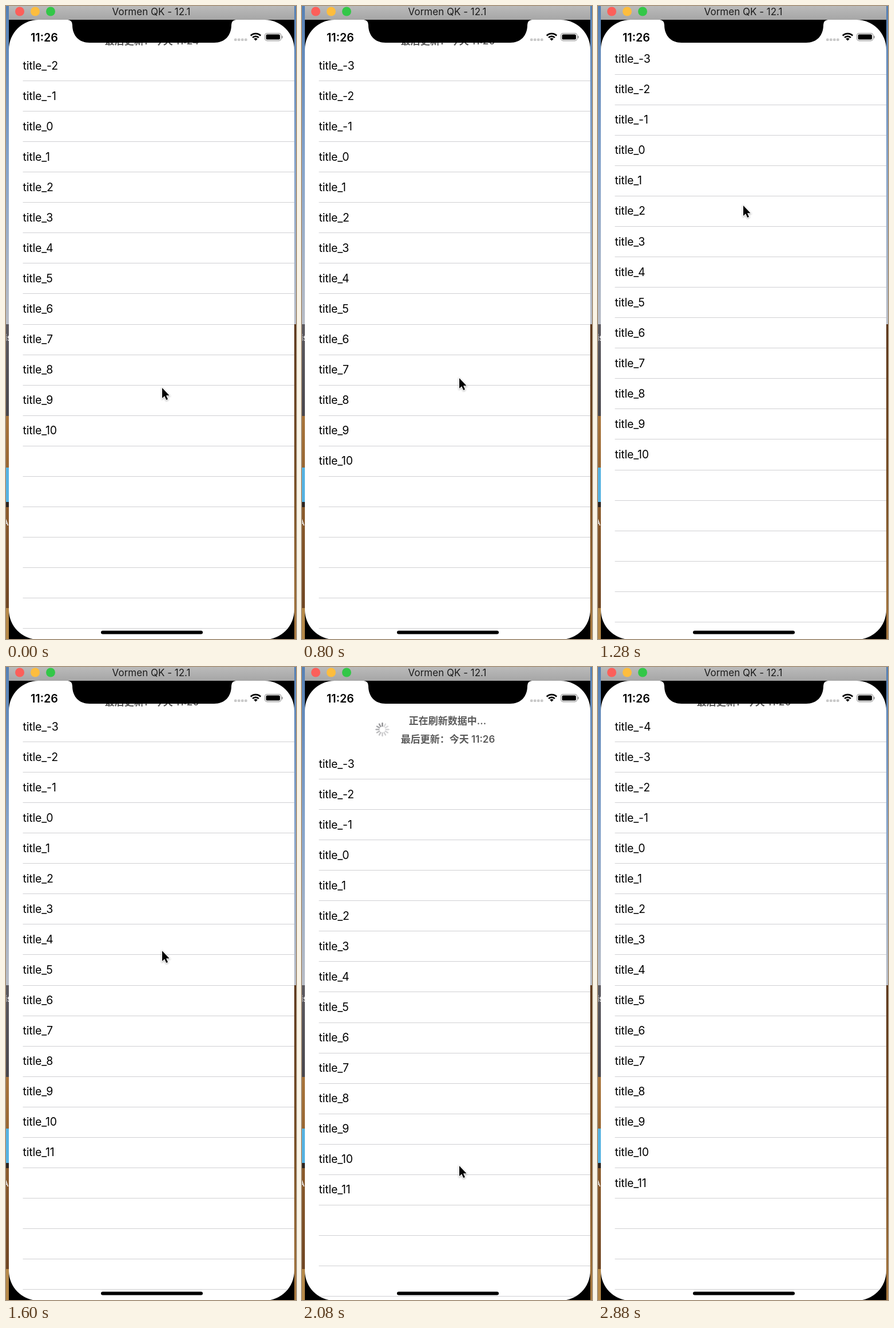
An HTML page with a canvas that plays this animation: 507x1104 px, repeating every 3200 ms.

```html
<!DOCTYPE html>
<html lang="zh-CN">
<head>
<meta charset="utf-8">
<style>
  html, body { margin: 0; width: 100%; height: 100%; overflow: hidden; }
  canvas { display: block; }
</style>
</head>
<body>
<canvas id="stage" width="507" height="1104"></canvas>
<script>
const ctx = document.getElementById('stage').getContext('2d');
const LOOP = 3200, STEP = 160, ROW = 53.07;
const FONT = 'Inter, "Noto Sans CJK SC", "Noto Sans CJK", sans-serif';

// One entry per step; the last one holds until the loop restarts.
const offsets = [0, 100, 62.5, 40, 15, 0, -36, -33, -11.4, 0, 0, 0, 157, 65, 35, 0];
const cursors = [[273, 666], [275, 790], [274, 675], [275, 669], [275, 660], [275, 649],
  [271, 520], [261, 400], [254, 348], [269, 400], [273, 495], [275, 639], [275, 870], [275, 870]];
const hints = { release: '松开立即刷新', loading: '正在刷新数据中...', done: '下拉可以刷新' };
const states = { 1: 'release', 12: 'release', 13: 'loading' };

function rect(x, y, w, h, color, radius = 0) {
  ctx.fillStyle = color;
  ctx.beginPath();
  ctx.roundRect(x, y, w, h, radius);
  ctx.fill();
}

function text(str, x, y, size, weight, color, align = 'left', spacing = 0) {
  ctx.font = `${weight} ${size}px ${FONT}`;
  ctx.letterSpacing = spacing + 'px';
  ctx.textAlign = align;
  ctx.fillStyle = color;
  ctx.fillText(str, x, y);
}

function disc(x, y, r, color) {
  rect(x - r, y - r, 2 * r, 2 * r, color, r);
}

function gradient(y0, y1, ...colors) {
  const g = ctx.createLinearGradient(0, y0, 0, y1);
  colors.forEach((c, i) => g.addColorStop(i / (colors.length - 1), c));
  return g;
}

function drawDesktop() {
  rect(0, 0, 507, 555, gradient(0, 555, '#5580b5', '#86a4cb', '#b9bdc6'));
  rect(0, 555, 6, 160, gradient(555, 715, '#5c5a60', '#48464c'));
  rect(0, 715, 6, 335, gradient(715, 1050, '#a8743a', '#8a5a2b', '#6f4522'));
  rect(0, 1050, 6, 54, '#b58848');
  rect(0, 805, 6, 60, '#55b2e2');
  rect(0, 865, 6, 9, '#2c2420');
  text('is', -2, 584, 15, 500, '#eee');
  text('A', -6, 906, 15, 500, '#eee');
  rect(503, 555, 4, 549, gradient(555, 1104, '#5a3418', '#74491f', '#a8783e'));
}

function drawWindow() {
  rect(5, 0, 499, 24, gradient(0, 24, '#bababa', '#a6a6a6'));
  rect(5, 24, 499, 1080, '#000');
  disc(24, 9.5, 8, '#fc5f5a');
  disc(51, 9.5, 8, '#fdbd3e');
  disc(78, 9.5, 8, '#33c748');
  text('Vormen QK - 12.1', 254, 16, 17, 400, '#1c1c1c', 'center');
}

function drawSpinner(strength) {
  ctx.lineWidth = 2.4;
  for (let i = 0; i < 12; i++) {
    ctx.rotate(Math.PI / 6);
    ctx.strokeStyle = `rgba(100,100,105,${strength * (0.25 + 0.5 * (i / 11) ** 2)})`;
    ctx.beginPath();
    ctx.moveTo(0, -6);
    ctx.lineTo(0, -11);
    ctx.stroke();
  }
}

function drawArrow() {
  ctx.rotate(0.21);
  ctx.lineWidth = 1.8;
  ctx.strokeStyle = '#5a5a5a';
  ctx.stroke(new Path2D('M0 14V-13M-8 -5L0 -13L8 -5'));
}

function drawHeader(offset, state, clock) {
  const y = offset - 63;
  text(hints[state], 254.5, 98 + y, 17, 600, '#5a5a5a', 'center');
  text('最后更新：今天 ' + clock, 255, 130 + y, 17, 600, '#5a5a5a', 'center');
  ctx.save();
  ctx.translate(140.5, 107 + y);
  ctx.lineCap = 'round';
  if (state === 'release') drawArrow();
  else drawSpinner(state === 'loading' ? 1 : 0.75);
  ctx.restore();
}

function drawList(offset, first, last) {
  for (let i = 0; i < 21; i++) {
    const y = offset + i * ROW;
    if (first + i <= last) text('title_' + (first + i), 29.5, 110.5 + y, 19.5, 400, '#000', 'left', -0.15);
    rect(29.5, Math.round(130 + y), 475, 1, '#d0d0d3');
  }
}

function drawStatusBar() {
  ctx.fillStyle = '#000';
  ctx.fill(new Path2D('M108 23V24Q116 25 116 33C116 52 128 64 146 64H364C382 64 394 52 394 33Q394 25 402 24V23Z'));
  text('11:26', 43, 61.5, 19.7, 600, '#000');
  for (let i = 0; i < 4; i++) rect(399 + i * 6, 56.5, 4.6, 4.6, '#c9c9c9', 1.5);

  const up = -Math.PI / 2, spread = Math.PI / 4;
  ctx.strokeStyle = '#000';
  for (const [radius, width] of [[2.3, 4.6], [7.6, 2.8], [12.3, 2.8]]) {
    ctx.lineWidth = width;
    ctx.beginPath();
    ctx.arc(436.5, 60.5, radius, up - spread, up + spread);
    ctx.stroke();
  }

  ctx.strokeStyle = '#999';
  ctx.lineWidth = 1.2;
  ctx.beginPath();
  ctx.roundRect(452.6, 47.6, 28.4, 13, 4);
  ctx.stroke();
  rect(454.6, 49.6, 24.4, 9, '#000', 2.2);
  rect(482, 51.8, 1.8, 4.6, '#999', 1);
  rect(166, 1089.5, 178, 6, '#000', 3);
}

function drawCursor([x, y]) {
  const shape = new Path2D('M0 0V18L4.2 14.2L7.2 21L10 19.8L7 13.2H12.6Z');
  ctx.save();
  ctx.translate(x, y);
  ctx.shadowColor = 'rgba(0,0,0,.35)';
  ctx.shadowBlur = 3;
  ctx.shadowOffsetY = 1;
  ctx.lineWidth = 2;
  ctx.strokeStyle = '#fff';
  ctx.stroke(shape);
  ctx.shadowColor = 'transparent';
  ctx.fillStyle = '#000';
  ctx.fill(shape);
  ctx.restore();
}

function draw(now) {
  const step = Math.min(Math.floor(now % LOOP / STEP), offsets.length - 1);
  const offset = offsets[step];
  const first = step < 2 ? -2 : step < 14 ? -3 : -4;
  const last = step < 9 ? 10 : 11;

  drawDesktop();
  drawWindow();
  ctx.save();
  ctx.beginPath();
  ctx.roundRect(5, 24, 499, 1081, 52);
  ctx.fillStyle = '#fff';
  ctx.fill();
  ctx.clip();
  drawHeader(offset, states[step] || 'done', step < 2 ? '11:24' : '11:26');
  drawList(offset, first, last);
  drawStatusBar();
  ctx.restore();
  if (cursors[step]) drawCursor(cursors[step]);
  requestAnimationFrame(draw);
}
requestAnimationFrame(draw);
</script>
</body>
</html>
```
